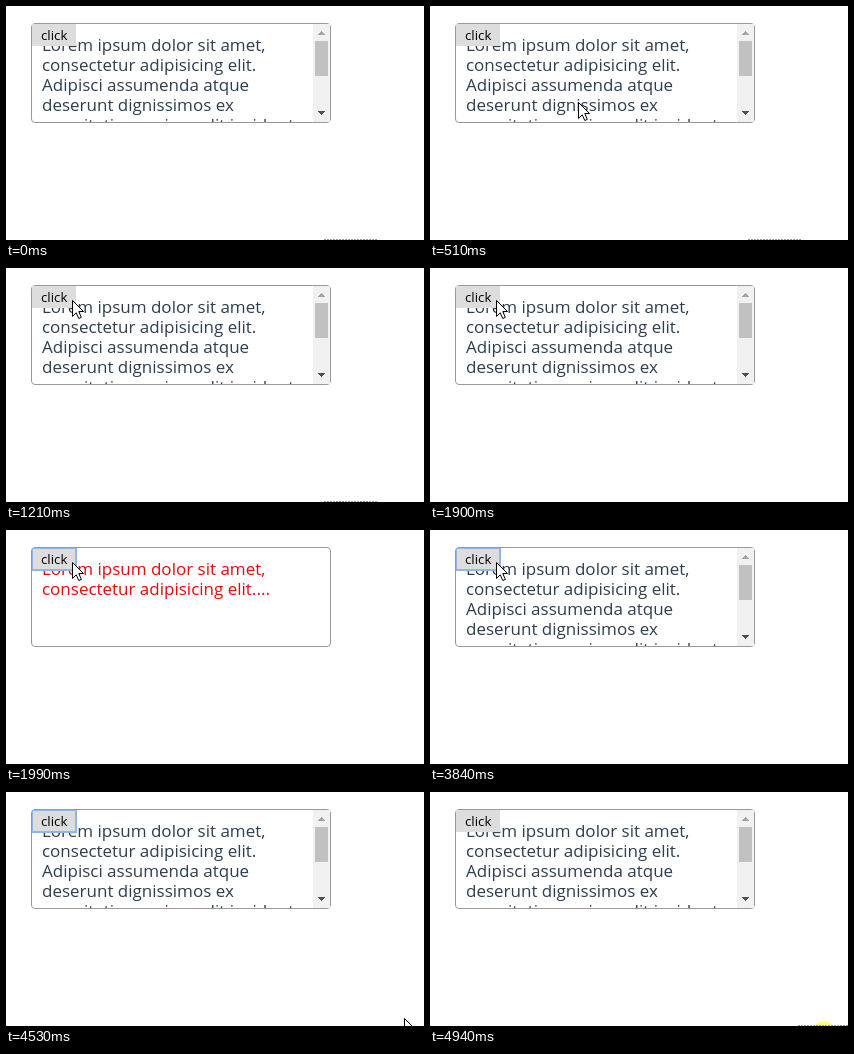
Animation of 418x234 px, one loop 5 s. Source, as an HTML page:

```html
<!DOCTYPE html>
<html lang="en">
<head>
<meta charset="utf-8">
<title>Text clamp toggle</title>
<style>
html, body { margin: 0; width: 100%; height: 100%; overflow: hidden; background: #fff; }
svg { display: block; width: 418px; height: 234px; }
text { font: 17px "Open Sans", "Noto Sans", sans-serif; }
.long { fill: #2c3e50; }
.short { fill: #f00; }
.label { font-size: 13.33px; fill: #000; }
.arrow { shape-rendering: crispEdges; }
</style>
</head>
<body>
<svg viewBox="0 0 418 234">
  <clipPath id="inner"><rect x="26" y="18" width="298" height="98"/></clipPath>
  <rect x="25.5" y="17.5" width="299" height="99" rx="3.5" fill="#fff" stroke="#999"/>
  <g clip-path="url(#inner)">
    <g id="full">
      <text class="long"></text>
      <rect x="307" y="18" width="17" height="98" fill="#f1f1f1"/>
      <rect x="309" y="35" width="13" height="35" fill="#c1c1c1"/>
      <path class="arrow" d="M311.5 29h8l-4-4z" fill="#a3a3a3"/>
      <path class="arrow" d="M311.5 105h8l-4 4z" fill="#505050"/>
    </g>
    <text id="clamped" class="short"></text>
    <rect x="26" y="18" width="44" height="22" fill="#ddd"/>
    <rect id="focus" x="26" y="18" width="44" height="22" fill="none" stroke="#8fb4ee" stroke-width="2"/>
    <text class="label" x="35" y="34">click</text>
  </g>
  <circle id="press" cx="394" cy="240" r="11" fill="#ffff80"/>
  <path id="dots" d="M0 233.5h53" stroke="#999" stroke-dasharray="2 1"/>
  <path id="cursor" d="M.5 .5V16.5L4.2 12.8 6.8 18.5 9.3 17.4 6.8 11.5H11.5Z" fill="#fff" stroke="#000"/>
</svg>
<script>
const LOOP = 5000, TICK = 77;
const el = id => document.getElementById(id);
const show = (id, on) => el(id).setAttribute("visibility", on ? "visible" : "hidden");
const move = (id, x, y) => el(id).setAttribute("transform", `translate(${x} ${y})`);

function setLines(selector, lines) {
  document.querySelector(selector).innerHTML =
    lines.map((line, i) => `<tspan x="36" y="${45 + 20 * i}">${line}</tspan>`).join("");
}
const opening = "Lorem ipsum dolor sit amet,";
const second = "consectetur adipisicing elit.";
setLines(".long", [opening, second, "Adipisci assumenda atque",
  "deserunt dignissimos ex", "exercitationem impedit incidunt"]);
setLines(".short", [opening, second + "..."]);

// Each stroke bends past its via point, slowing down in discrete ticks.
const home = [396, 293];
const strokes = [
  { start: 350, ticks: 8, via: [232, 163], to: [67, 33] },
  { start: 1210, ticks: 1, via: [66, 32], to: [66, 32] },
  { start: 4070, ticks: 9, via: [444, 129], to: [395, 234] }
];

function pointer(t) {
  let pos = home;
  for (const { start, ticks, via, to } of strokes) {
    if (t < start) break;
    const n = Math.min(ticks, Math.floor((t - start) / TICK) + 1);
    const u = 1 - (1 - n / ticks) ** 3;
    pos = pos.map((p, i) =>
      Math.round((1 - u) ** 2 * p + 2 * u * (1 - u) * via[i] + u * u * to[i]));
  }
  return pos;
}

function draw(t) {
  const within = (a, b) => t >= a && t < b;
  const clamped = within(1990, 3840);
  show("full", !clamped);
  show("clamped", clamped);
  show("focus", within(1990, 4840));
  show("press", t >= 4840);
  show("dots", !within(1900, 4940));
  move("dots", t < 1900 ? 318 : 368, 0);
  move("cursor", ...pointer(t));
}

const start = performance.now();
function frame() {
  draw((performance.now() - start) % LOOP);
  requestAnimationFrame(frame);
}
frame();
</script>
</body>
</html>
```
